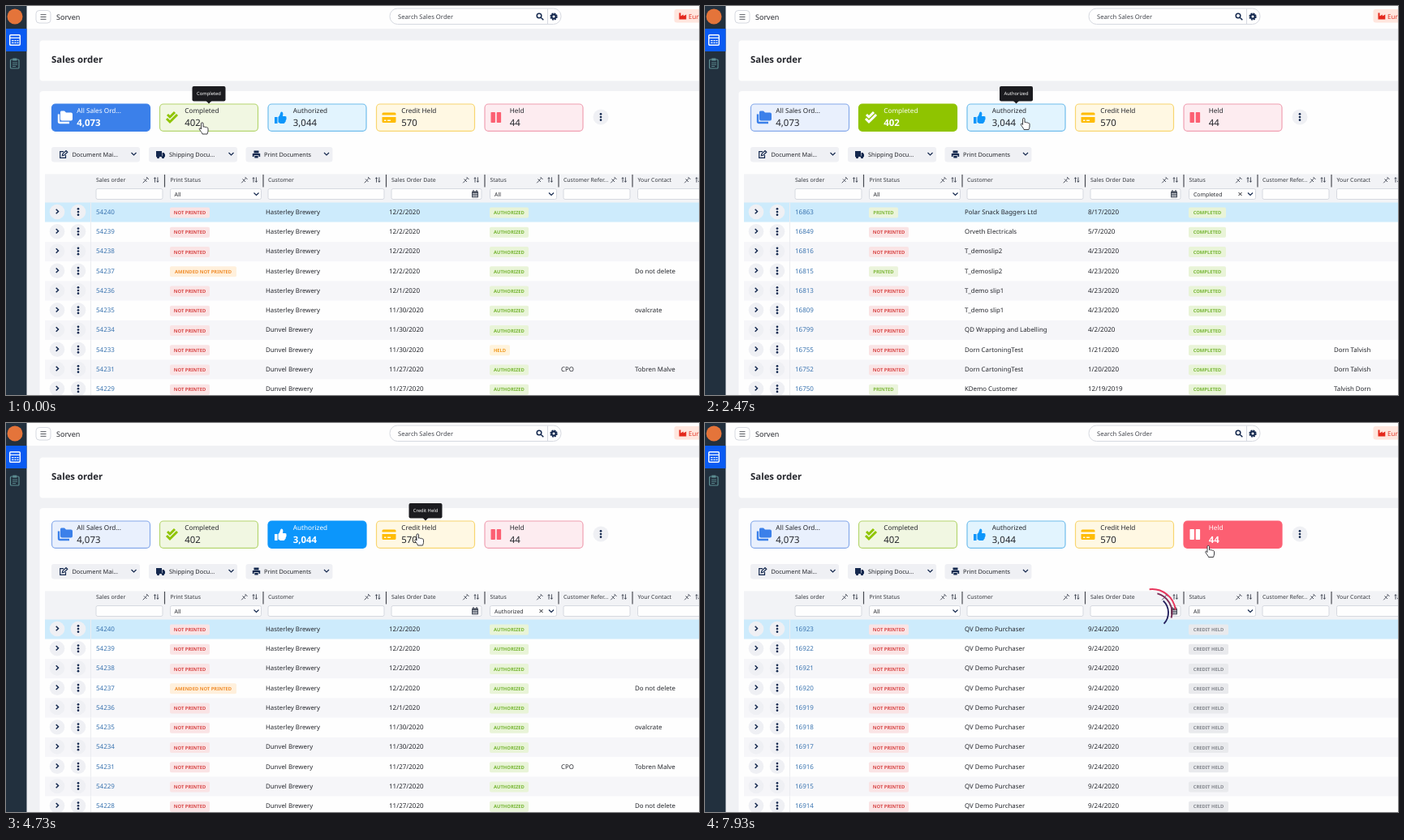
An HTML page that plays this animation: 854 by 480 pixels, repeating every 8 s.

```html
<!DOCTYPE html>
<html lang="en">
<head>
<meta charset="utf-8">
<title>Sales order list</title>
<style>
html, body { margin: 0; width: 100%; height: 100%; overflow: hidden; background: #f0f1f4; }
svg { display: block; width: 100vw; height: 100vh; }
text { font-family: "Noto Sans", "Open Sans", sans-serif; text-rendering: geometricPrecision; white-space: pre; }
</style>
</head>
<body>
<svg viewBox="0 0 854 480">
  <g id="chrome"></g><g id="cards"></g><g id="table"></g><g id="filter"></g>
  <g id="spinner" fill="none" stroke-width="1.9"></g>
  <g id="tip"></g>
  <path id="cursor" fill="#fff" stroke="#2a2a2e" stroke-width=".9" stroke-linejoin="round"/>
</svg>
<script>
const LOOP = 8000, INK = '#24262c', NAVY = '#14284e', SOFT = '#eff0f4', LINE = '#d6d9e0', PANEL = '#fefefe';
const $ = id => document.getElementById(id);

// Drawing helpers, each returning SVG markup
const rect = (x, y, w, h, fill, r = 0, stroke = 'none', sw = 1) =>
  `<rect x="${x}" y="${y}" width="${w}" height="${h}" rx="${r}" fill="${fill}" stroke="${stroke}" stroke-width="${sw}"/>`;
const circle = (x, y, r, fill) => `<circle cx="${x}" cy="${y}" r="${r}" fill="${fill}"/>`;
const text = (x, y, s, size = 8, fill = INK, weight = 400, anchor = 'start') =>
  `<text x="${x}" y="${y}" font-size="${size}" fill="${fill}" font-weight="${weight}" text-anchor="${anchor}">${s}</text>`;
const solid = (x, y, d, fill) => `<path transform="translate(${x} ${y})" d="${d}" fill="${fill}" fill-rule="evenodd"/>`;
const line = (x, y, d, stroke = NAVY, w = 1.3) =>
  `<path transform="translate(${x} ${y})" d="${d}" fill="none" stroke="${stroke}" stroke-width="${w}"/>`;
const chevron = (x, y) => line(x, y, 'M-3-1.5 0 1.5 3-1.5', NAVY, 1.2);
const kebab = (x, y) => [-3.7, 0, 3.7].map(d => circle(x, y + d, 1.35, NAVY)).join('');
const calendar = (x, y) => rect(x - 4, y - 3.5, 8, 8, '#434a58', 1) +
  line(x, y, 'M-3-.6H3M-3 1.4H3M-3 3.2H3', '#f2f3f6', .8) + line(x, y, 'M-2-5V-3M2-5V-3', '#434a58', 1.2);

const CARDS = [
  { name: 'All Sales Ord...', count: '4,073', x: 56.5, main: '#3b80ea', fill: '#e9f0fd', edge: '#86a9ea',
    icon: c => solid(73, 137.5, 'M-5-8H-1L1-6H7Q9-6 9-4V2Q9 4 7 4H-4Q-6 4-6 2V-7Z', c) +
      line(73, 137.5, 'M-8-4V5Q-8 6.5-6.5 6.5H5', c, 2.4) },
  { name: 'Completed', count: '402', x: 189.5, main: '#8fc400', fill: '#f1f7e2', edge: '#b5d670',
    icon: c => line(204, 138, 'M-5-4-2-1 4-7M-6 1-2 5 7-4', c, 2.9) },
  { name: 'Authorized', count: '3,044', x: 323, main: '#0c96fb', fill: '#e2f4fe', edge: '#70bdec',
    icon: c => solid(338, 138, 'M-7-1H-3.5V7H-7ZM-2.5-1C0-2.5-.5-7 1.5-7.5 4-7.5 3.5-3.5 3-2H6Q8-2 7.5 0 8 2 6.8 3 7 5 5.5 5.8 5.5 7 4 7H0L-2.5 5.5Z', c) },
  { name: 'Credit Held', count: '570', x: 456.5, main: '#ffbc05', fill: '#fff8e3', edge: '#f8d671',
    icon: c => solid(472, 137.5, 'M-7-6H7Q8.5-6 8.5-4.5V-3H-8.5V-4.5Q-8.5-6-7-6ZM-8.5-.5H8.5V5Q8.5 6.5 7 6.5H-7Q-8.5 6.5-8.5 5ZM-6 3V4.5H-3.5V3ZM-2 3V4.5H2V3Z', c) },
  { name: 'Held', count: '44', x: 590, main: '#fc5f72', fill: '#fdecf0', edge: '#f0a0b2',
    icon: c => rect(597.5, 131, 5.4, 13, c, .8) + rect(604.7, 131, 5.4, 13, c, .8) }
];

const BADGES = {
  'NOT PRINTED': ['#d84848', '#fae4e5', 49], 'PRINTED': ['#7fb83c', '#ebf4dc', 36],
  'AMENDED NOT PRINTED': ['#f08d2c', '#fff0dc', 82], 'AUTHORIZED': ['#76b534', '#e9f4d8', 48],
  'COMPLETED': ['#76b534', '#e9f4d8', 46], 'CREDIT HELD': ['#82858c', '#e9eaed', 49], 'HELD': ['#f09a20', '#fff3dc', 25]
};

// Row fields: number, customer, date, print status, status, reference, contact
const order = (id, who, date, print, status, ref = '', contact = '') => ({ id, who, date, print, status, ref, contact });
const NP = 'NOT PRINTED', PR = 'PRINTED', AU = 'AUTHORIZED', CO = 'COMPLETED';
const H = 'Hasterley Brewery', D = 'Dunvel Brewery';
const all = [
  order(54240, H, '12/2/2020', NP, AU), order(54239, H, '12/2/2020', NP, AU), order(54238, H, '12/2/2020', NP, AU),
  order(54237, H, '12/2/2020', 'AMENDED NOT PRINTED', AU, '', 'Do not delete'),
  order(54236, H, '12/1/2020', NP, AU), order(54235, H, '11/30/2020', NP, AU, '', 'ovalcrate'),
  order(54234, D, '11/30/2020', NP, AU), order(54233, D, '11/30/2020', NP, 'HELD'),
  order(54231, D, '11/27/2020', NP, AU, 'CPO', 'Tobren Malve'), order(54229, D, '11/27/2020', NP, AU),
  order(54228, D, '11/27/2020', NP, AU, '', 'Do not delete')
];
const completed = [
  order(16863, 'Polar Snack Baggers Ltd', '8/17/2020', PR, CO), order(16849, 'Orveth Electricals', '5/7/2020', NP, CO),
  order(16816, 'T_demoslip2', '4/23/2020', NP, CO), order(16815, 'T_demoslip2', '4/23/2020', PR, CO),
  order(16813, 'T_demo slip1', '4/23/2020', NP, CO), order(16809, 'T_demo slip1', '4/23/2020', NP, CO),
  order(16799, 'QD Wrapping and Labelling', '4/2/2020', NP, CO),
  order(16755, 'Dorn CartoningTest', '1/21/2020', NP, CO, '', 'Dorn Talvish'),
  order(16752, 'Dorn CartoningTest', '1/20/2020', NP, CO, '', 'Dorn Talvish'),
  order(16750, 'KDemo Customer', '12/19/2019', PR, CO, '', 'Talvish Dorn')
];
const creditHeld = Array.from({ length: 10 }, (_, i) =>
  order(16923 - i, 'QV Demo Purchaser', '9/24/2020', NP, 'CREDIT HELD'));
const LISTS = [all, completed, all.filter(o => o.status === AU), creditHeld];

const CLICKS = [0, 730, 3100, 5000, 7800], LOADS = [0, 1450, 3770, 5800];
const TIPS = [[0, 730, 1], [2450, 3100, 2], [4270, 5000, 3], [7000, 7800, 4]];
// Pointer path: time, x, y
const PATH = [[0, 242, 144], [950, 242, 144], [1450, 514, 184], [1600, 514, 184], [1730, 510.5, 178], [1870, 510.5, 178],
  [2450, 393, 138.5], [3420, 393, 138.5], [3850, 488, 178], [4000, 488, 178], [4270, 507.5, 137], [5600, 507.5, 137],
  [6170, 618.5, 172.5], [6400, 618.5, 172.5], [6530, 617, 153], [6670, 617, 153], [7000, 620.5, 151.5], [8000, 620.5, 151.5]];
const ARROW = 'M0 0V10L2.4 7.8 4.2 11.6 6 10.8 4.3 7.1H7.3Z';
const HAND = 'M-1.5 1C-1.5-.6 1-.6 1 1V5.2C2 4.5 3 4.8 3.2 5.6 4 5 5 5.3 5.3 6.1 6 5.8 7 6 7 7.2V10.5C7 12 6.2 12.6 6 14H0C-.2 12.5-2 11-3.6 8.2-4.2 7-3 6.2-2.2 7L-1.5 8Z';

function drawChrome() {
  const columns = [[111, 82, 195.5, 'Sales order'], [202.5, 112, 317, 'Print Status'], [323, 143, 468.5, 'Customer'],
    [475, 111, 590, 'Sales Order Date'], [596.5, 82, 681, 'Status'], [687, 82, 772, 'Customer Refer...'], [778.5, 82, 863, 'Your Contact']];
  let s = rect(26, 0, 828, 28, PANEL) + rect(41.5, 42.5, 830, 50, PANEL, 4) + rect(41.5, 105, 830, 400, PANEL, 4);
  // Sidebar
  s += rect(0, 0, 25.5, 480, '#22303e') + circle(11, 13, 9.5, '#e4743a') + rect(0, 28, 25.5, 28, '#0a5bf2');
  s += rect(4.7, 35.7, 12.6, 12.6, 'none', 1, '#fff', 1.4) + line(11, 42, 'M-6-2.6H6M-4 .6H-1.5M-.5.6H1.5M2.5.6H4.5M-4 3.4H-1.5M-.5 3.4H1.5M2.5 3.4H4.5', '#fff');
  s += rect(5.5, 66, 10.5, 11, 'none', 1, '#5d8d92', 1.2) + rect(8.3, 64.5, 5, 3, '#5d8d92') + line(11, 71, 'M-3-1H3M-3 1.2H3M-3 3.5H1', '#5d8d92', .9);
  // Top bar
  s += rect(37, 5.5, 18, 15.5, PANEL, 4, LINE) + line(46, 13.5, 'M-3.5-2.8H3.5M-3.5 0H3.5M-3.5 2.8H3.5', '#55585f', 1);
  s += text(62, 17, 'Sorven', 9) + rect(473, 3, 211, 19.5, PANEL, 9.5, LINE) + text(483, 15.7, 'Search Sales Order', 7.7, '#45484f');
  s += line(657, 12, 'M2.8 0A2.8 2.8 0 1 1-2.8 0 2.8 2.8 0 1 1 2.8 0M2 2 5.3 5.3', NAVY, 1.5) + line(667.5, 13, 'M0-9.5V9.5', LINE, 1);
  s += `<circle cx="675" cy="13" r="3.9" fill="none" stroke="${NAVY}" stroke-width="1.5" stroke-dasharray="2 1.063"/>` +
    `<circle cx="675" cy="13" r="2.5" fill="none" stroke="${NAVY}" stroke-width="1.9"/>`;
  s += rect(823.5, 4, 40, 16.5, '#ffe6de', 3) + solid(834, 13, 'M-4.5 3.5V-4.5H-2.5V-.5L.8-2.5V-.5L4.3-2.5V3.5Z', '#e4281c') + text(841, 16, 'Eur', 8, '#e4382a');
  s += text(56, 69.6, 'Sales order', 11.4, INK, 700) + circle(733, 137, 9.5, SOFT) + kebab(733, 137);
  // Document buttons
  [[56, 109, 'Document Mai...', 81.5], [176, 109, 'Shipping Docu...', 201], [295.5, 107, 'Print Documents', 318]].forEach(([x, w, label, tx]) =>
    s += rect(x, 174, w, 18.5, SOFT, 3) + text(tx, 186.2, label, 7.35, INK, 500) + chevron(x + w - 7.5, 182.5));
  s += line(71, 183, 'M2.5 1V4.3H-4.3V-3.3H0M-1.6 1.7-1-.8 3-4.5 4.8-2.8 1 1Z', NAVY, 1.2);
  s += solid(190, 183, 'M-5-4H2V3H-5ZM2.6-2H4.5L6 0V3H2.6Z', NAVY) + circle(187.5, 186.5, 1.7, NAVY) + circle(193.5, 186.5, 1.7, NAVY);
  s += solid(308.5, 183, 'M-3-4.5H3V-1.5H-3ZM-4.7-1H4.7V3H3V1.2H-3V3H-4.7ZM-2.2 2H2.2V4.5H-2.2Z', NAVY);
  // Table header
  s += rect(48, 207.5, 806, 35.5, '#f2f3f6');
  columns.forEach(([x, w, end, label], i) => {
    s += text(x, 217, label, 6.9, '#33363d') + rect(x, 225.5, w, 13, PANEL, 2, LINE);
    s += line(end - 23, 214.5, 'M.5-3.5 3.5-.5M1.8-2.2-.8.4M-2.5-1 1 2.5M-.8.8-3.8 3.8', '#4a4f5c', 1);
    s += line(end - 10.3, 214.5, 'M-1.7 3.2V-2.8M-3-1.3-1.7-2.8-.4-1.3M1.7-3.2V2.8M.4 1.3 1.7 2.8 3 1.3', '#3c414e', .9);
    if (i < 6) s += line(end, 208, 'M0 0V15.5', '#484b52', 1.2);
  });
  s += text(207.5, 234.7, 'All', 6.9) + chevron(308.5, 232) + calendar(578, 232);
  $('chrome').innerHTML = s;
}

function drawCards(selected) {
  $('cards').innerHTML = CARDS.map((c, i) => {
    const on = i === selected, ink = on ? '#fff' : INK, tx = c.x + 30.8;
    return rect(c.x, 121, 121, 33.3, on ? c.main : c.fill, 4.5, on ? c.main : c.edge, 1.2) + c.icon(on ? '#fff' : c.main) +
      text(tx, 131.8, c.name, 8.2, ink) + text(tx, 148.4, c.count, 11.4, ink, on ? 700 : 400);
  }).join('');
}

function drawTable(list) {
  const badge = (x, y, label) => {
    const [ink, fill, w] = BADGES[label];
    return rect(x, y - 5.5, w, 13, fill, 2) + text(x + w / 2, y + 3.1, label, 5.8, ink, 700, 'middle');
  };
  $('table').innerHTML = LISTS[list].slice(0, 10).map((o, i) => {
    const y = 254 + i * 24.25, base = y + 2.8;
    return rect(48, y - 11.5, 806, 24.25, i ? i % 2 ? PANEL : '#f6f6f9' : '#cdebfc') + line(104.5, y - 11.5, 'M0 0V24.25', '#ebecf0', 1) +
      circle(63, y, 9.3, SOFT) + line(63, y - .5, 'M-1.3-2.8 1.5 0-1.3 2.8', NAVY, 1.5) + circle(89, y, 9.3, SOFT) + kebab(89, y) +
      text(111, base, o.id, 8, '#3a74b0') + badge(202, y, o.print) + text(320, base, o.who, 7.85) +
      text(472, base, o.date, 8) + badge(596, y, o.status) + text(684, base, o.ref, 7.85) + text(775, base, o.contact, 7.85);
  }).join('');
}

function drawFilter(card) {
  $('filter').innerHTML = text(602, 234.7, card ? CARDS[card].name : 'All', 6.9) + chevron(672, 232) +
    (card ? line(659.5, 232, 'M-2-2 2 2M2-2-2 2', INK, 1) : '');
}

function drawTip(card) {
  if (!card) return $('tip').innerHTML = '';
  const c = CARDS[card], x = c.x + 60.5, w = c.name.length < 6 ? 26 : 41;
  $('tip').innerHTML = rect(x - w / 2, 99, w, 18.5, '#1b1b1f', 2) + solid(x, 117, 'M-3.5 0H3.5L0 3.5Z', '#1b1b1f') +
    text(x, 110.4, c.name, 5.8, '#fff', 400, 'middle');
}

// Three quarter rings turning at different speeds
function drawSpinner(ms) {
  $('spinner').innerHTML = ms < 0 ? '' : [[29, '#e8365c', 20, .14], [24.5, '#7a2f58', 30, .23], [20, '#221f5c', 45, .33]].map(([r, color, start, speed]) => {
    const k = r * Math.SQRT1_2;
    return `<path transform="translate(551 234) rotate(${start + speed * ms})" d="M${-k} ${-k}A${r} ${r} 0 0 1 ${k} ${-k}" stroke="${color}"/>`;
  }).join('');
}

function drawCursor(t) {
  const i = PATH.findIndex(p => p[0] > t), [t0, x0, y0] = PATH[i - 1], [t1, x1, y1] = PATH[i];
  const u = (t - t0) / (t1 - t0), e = u * u * (3 - 2 * u), x = x0 + (x1 - x0) * e, y = y0 + (y1 - y0) * e;
  const over = y > 120 && y < 155 && CARDS.some(c => x > c.x && x < c.x + 121);
  $('cursor').setAttribute('d', over ? HAND : ARROW);
  $('cursor').setAttribute('transform', `translate(${x} ${y})`);
}

const last = {};
function update(draw, value) {
  if (last[draw.name] !== value) draw(last[draw.name] = value);
}

function frame() {
  const t = performance.now() % LOOP;
  const selected = CLICKS.findLastIndex(c => c <= t), loaded = LOADS.findLastIndex(l => l <= t);
  const tip = TIPS.find(([from, to]) => t >= from && t < to);
  update(drawCards, selected);
  update(drawTable, loaded);
  update(drawFilter, selected === loaded ? loaded : 0);
  update(drawTip, tip ? tip[2] : 0);
  drawSpinner(selected === loaded ? -1 : t - CLICKS[selected]);
  drawCursor(t);
  requestAnimationFrame(frame);
}
drawChrome();
frame();
</script>
</body>
</html>
```
